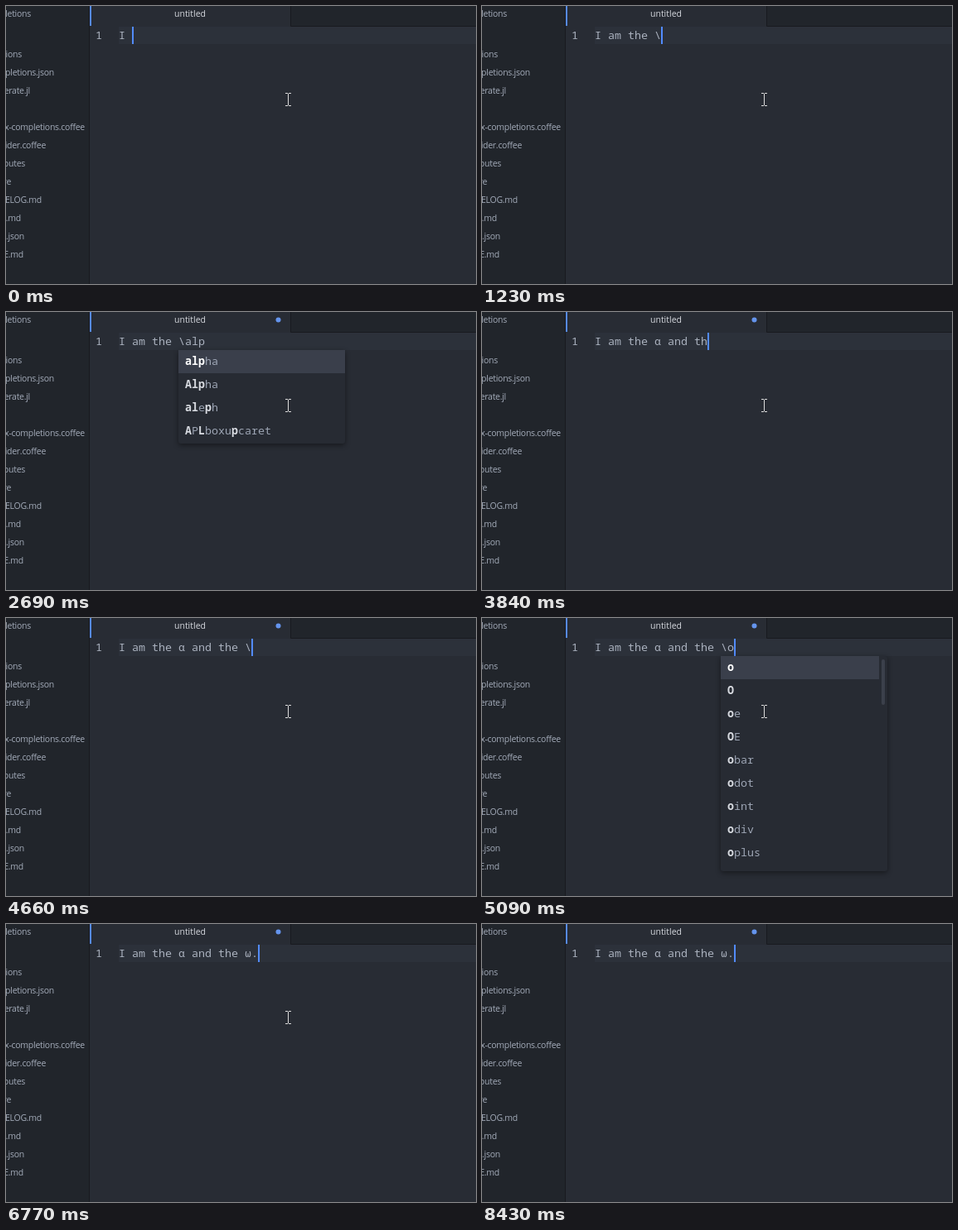
These frames come from a looping animation (567x336 px, 8.53 s). An HTML page:

```html
<!DOCTYPE html>
<html lang="en">
<head>
<meta charset="utf-8">
<title>Editor completions</title>
<style>
  html, body { margin: 0; width: 100%; height: 100%; overflow: hidden; background: #282c34; }
  svg { display: block; width: 567px; height: 336px; }
  text { white-space: pre; }
  .ui { font: 10.5px "Open Sans", "Noto Sans", sans-serif; letter-spacing: -.27px; fill: #a4acba; }
  .tree { text-anchor: end; }
  .tab { letter-spacing: 0; text-anchor: middle; fill: #d7dae0; }
  .code { font: 13.333px "Noto Sans Mono", "DejaVu Sans Mono", monospace; fill: #abb2bf; }
  .panel { fill: #272b33; filter: drop-shadow(0 2px 3px rgba(0, 0, 0, .45)); }
  .item { fill: #9da5b4; }
  .hit { font-weight: 700; fill: #d7dae0; }
  .chosen .hit { fill: #fff; }
</style>
</head>
<body>
<svg viewBox="0 0 567 336">
  <rect width="567" height="336" fill="#282c34"/>
  <rect width="100" height="336" fill="#21252b"/>
  <rect x="344" width="223" height="24" fill="#21252b"/>
  <path d="M100.5 0V336M343.5 0V24.5H567" fill="none" stroke="#181a1f"/>
  <rect x="101" width="2" height="24" fill="#568af2"/>
  <rect x="136" y="25" width="431" height="21" fill="#2c313a"/>
  <g id="tree" class="ui tree"></g>
  <text class="ui tab" x="222" y="13">untitled</text>
  <circle id="dot" cx="328.5" cy="9.5" r="3" fill="#6494ed"/>
  <text class="code" x="108" y="40">1</text>
  <text id="line" class="code" x="136" y="40"></text>
  <rect id="caret" y="25" width="2" height="21" fill="#528bff"/>
  <g id="menu" class="code"></g>
  <path id="mouse" d="M-3-7.5H0M1-7.5H4M.5-7V7M-3 7.5H0M1 7.5H4" fill="none" stroke="#dcdcdc"/>
</svg>
<script>
const LOOP = 8530, LEFT = 136, CHAR = 8, ROW = 28;
const el = id => document.getElementById(id);

// Tree labels: text, right edge, baseline
const tree = [
  ['completions', 30, 13], ['completions', 19, 62], ['completions.json', 58, 84],
  ['generate.jl', 29, 106], ['latex-completions.coffee', 95, 150],
  ['provider.coffee', 48, 172], ['.gitattributes', 23, 194], ['.gitignore', 6, 216],
  ['CHANGELOG.md', 43, 238], ['README.md', 18, 260], ['package.json', 22, 282],
  ['LICENSE.md', 21, 304]
];
el('tree').innerHTML = tree.map(([s, x, y]) => `<text x="${x}" y="${y}">${s}</text>`).join('');

// Completion lists; thumb is the scrollbar handle height
const menus = {
  a: { thumb: 20, words: 'aa AA ae AE ast Alpha alpha amalg aleph' },
  al: { thumb: 40, words: 'alpha Alpha aleph amalg angle allequal APLlog apple approxeq' },
  alp: { thumb: 0, words: 'alpha Alpha aleph APLboxupcaret' },
  o: { thumb: 55, words: 'o O oe OE obar odot oint odiv oplus' },
  om: { thumb: 160, words: 'omega Omega ominus otimes Otimes omicron Omicron otimeshat oturnedcomma' }
};

const and = 'I am the α', end = and + ' and the ';
const steps = [
  [0, { text: 'I ', caret: true, dot: false, menu: '', mouse: [340, 113] }],
  ...[140, 270, 410, 540, 680, 820, 960].map((t, i) => [t, { text: 'I am the '.slice(0, i + 3) }]),
  [1230, { text: 'I am the \\' }],
  [1540, { dot: true }],
  [1680, { text: 'I am the \\a' }],
  [1820, { menu: 'a' }],
  [1960, { text: 'I am the \\al' }],
  [2100, { menu: 'al' }],
  [2240, { text: 'I am the \\alp' }],
  [2380, { menu: 'alp' }],
  [2690, { caret: false }],
  [2810, { text: and, menu: '', caret: true }],
  [3090, { text: and + ' ' }],
  [3230, { text: and + ' a' }],
  [3370, { text: and + ' and' }],
  [3520, { text: and + ' and ' }],
  [3840, { text: and + ' and th' }],
  [3980, { text: and + ' and the' }],
  [4260, { text: end }],
  [4660, { text: end + '\\' }],
  [4940, { text: end + '\\o' }],
  [5090, { menu: 'o' }],
  [5250, { text: end + '\\om', menu: 'om' }],
  [5680, { caret: false }],
  [5820, { text: end + 'ω', menu: '', caret: true }],
  [6230, { caret: false }],
  [6650, { caret: true }],
  [6770, { text: end + 'ω.' }],
  [7300, { caret: false }],
  [7580, { caret: true }],
  [7720, { mouse: [371, 150] }],
  [7870, { mouse: [428, 218] }],
  [8010, { mouse: [511, 319], caret: false }],
  [8150, { mouse: [600, 400] }],
  [8430, { caret: true }]
];

// Embolden the letters of the query, found in order and ignoring case
function highlight(word, query) {
  let next = 0;
  return [...word].map(c => {
    if (next >= query.length || c.toLowerCase() !== query[next]) return c;
    next++;
    return `<tspan class="hit">${c}</tspan>`;
  }).join('');
}

function menuMarkup(query, x) {
  if (!query) return '';
  const { thumb, words } = menus[query], list = words.split(' ');
  const height = thumb ? 260 : list.length * ROW + 1;
  const items = list.map((word, i) =>
    `<text class="item${i ? '' : ' chosen'}" x="${x + 8}" y="${64 + i * ROW}">${highlight(word, query)}</text>`);
  return `<rect class="panel" x="${x}" y="46" width="201" height="${height}" rx="3"/>
    <rect x="${x}" y="46" width="${thumb ? 191 : 201}" height="${ROW}" fill="#3a3f4b"/>
    <rect x="${x + 194}" y="50" width="4" height="${thumb}" rx="2" fill="#3b404b"/>` + items.join('');
}

let shown = -1;
function draw(now) {
  const t = now % LOOP;
  const count = steps.filter(([at]) => at <= t).length;
  if (count !== shown) {
    shown = count;
    const s = Object.assign({}, ...steps.slice(0, count).map(([, change]) => change));
    const show = (id, on) => el(id).setAttribute('visibility', on ? 'visible' : 'hidden');
    el('line').textContent = s.text;
    el('caret').setAttribute('x', LEFT + CHAR * s.text.length);
    show('caret', s.caret);
    show('dot', s.dot);
    el('menu').innerHTML = menuMarkup(s.menu, LEFT + CHAR * s.text.indexOf('\\'));
    el('mouse').setAttribute('transform', `translate(${s.mouse})`);
  }
}

const start = performance.now();
function tick() {
  draw(performance.now() - start);
  requestAnimationFrame(tick);
}
tick();
</script>
</body>
</html>
```
